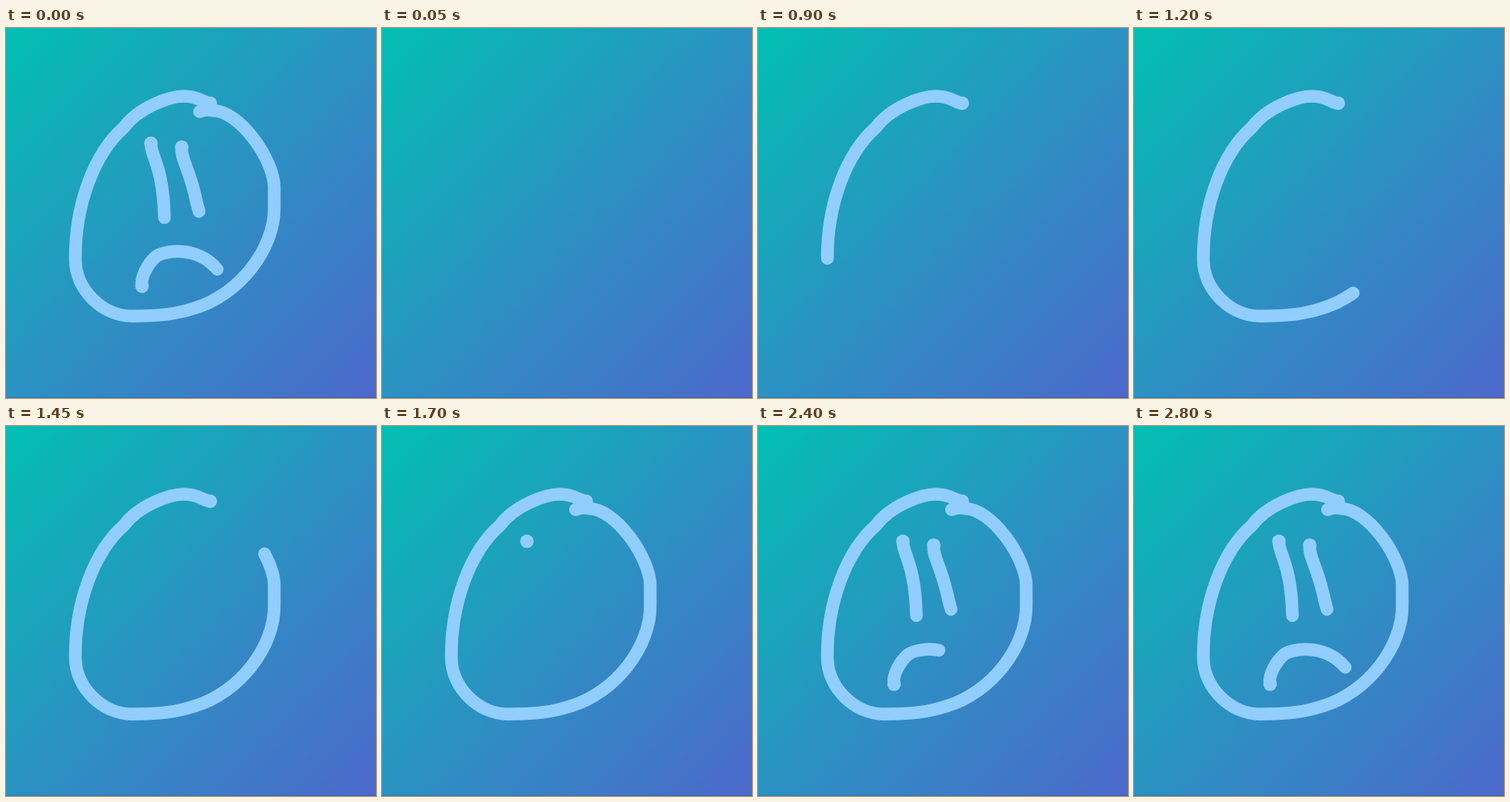
An HTML page that plays this animation: 480x480 px, repeating every 3700 ms.

```html
<!DOCTYPE html>
<html lang="en">
<head>
<meta charset="utf-8">
<title>Sad face doodle</title>
<style>
  html, body { margin: 0; width: 100%; height: 100%; overflow: hidden; }
  svg {
    display: block; width: 100vw; height: 100vh;
    background: linear-gradient(135deg, #02bfb2, #2b92c2 50%, #4d68cb);
    box-shadow: inset 0 -1px rgba(40, 60, 90, .25);
  }
  path {
    fill: none; stroke: #91ceff; stroke-width: 16.5;
    stroke-linecap: round; stroke-linejoin: round;
    marker-start: url(#blob);
  }
</style>
</head>
<body>
<svg viewBox="0 0 480 480">
  <marker id="blob" overflow="visible"><circle r=".53" fill="#91ceff"/></marker>
  <!-- head, left eye, right eye, mouth -->
  <path pathLength="1" data-start="400" data-end="1700" d="M265 97.5 C256 97 250 88.5 231 88.5
    S172 103 153 129 C114 163 89.5 230 90 300 C90 340 126 373.7 163 373.7
    S222 371 245 363.3 C302 346 349 287 348 232 V207
    C348 171 303 107 268 107 Q260 105 251 108.5"/>
  <path pathLength="1" data-start="1700" data-end="1900" d="M188 149.5 C187 165 204 178 205.5 246"/>
  <path pathLength="1" data-start="1900" data-end="2150" d="M228 154.5 C226 170 238 180 247.5 227 L250.5 238"/>
  <path pathLength="1" data-start="2150" data-end="2550" d="M176.5 335 C174 323 185 305 194 297 S247 281 274 313"/>
</svg>
<script>
const LOOP = 3700, STEP = 50;
const RAMP = .175; // share of a stroke spent speeding up, and again slowing down

const strokes = [...document.querySelectorAll('path')].map(path => ({
  path, start: +path.dataset.start, end: +path.dataset.end
}));

// Steady pen speed with a soft start and a soft stop.
function ease(u) {
  if (u > .5) return 1 - ease(1 - u);
  return (u < RAMP ? u * u / (2 * RAMP) : u - RAMP / 2) / (1 - RAMP);
}

function draw(now) {
  const clock = Math.floor(now % LOOP / STEP) * STEP;
  const t = clock < STEP ? LOOP : clock; // the loop opens on the finished face
  for (const { path, start, end } of strokes) {
    const u = Math.max(0, Math.min(1, (t - start) / (end - start)));
    path.style.visibility = t < start ? 'hidden' : 'visible';
    path.style.strokeDasharray = u < 1 ? `${ease(u)} 2` : 'none';
  }
}

const begin = performance.now();
function tick() {
  draw(performance.now() - begin);
  requestAnimationFrame(tick);
}
tick();
</script>
</body>
</html>
```
